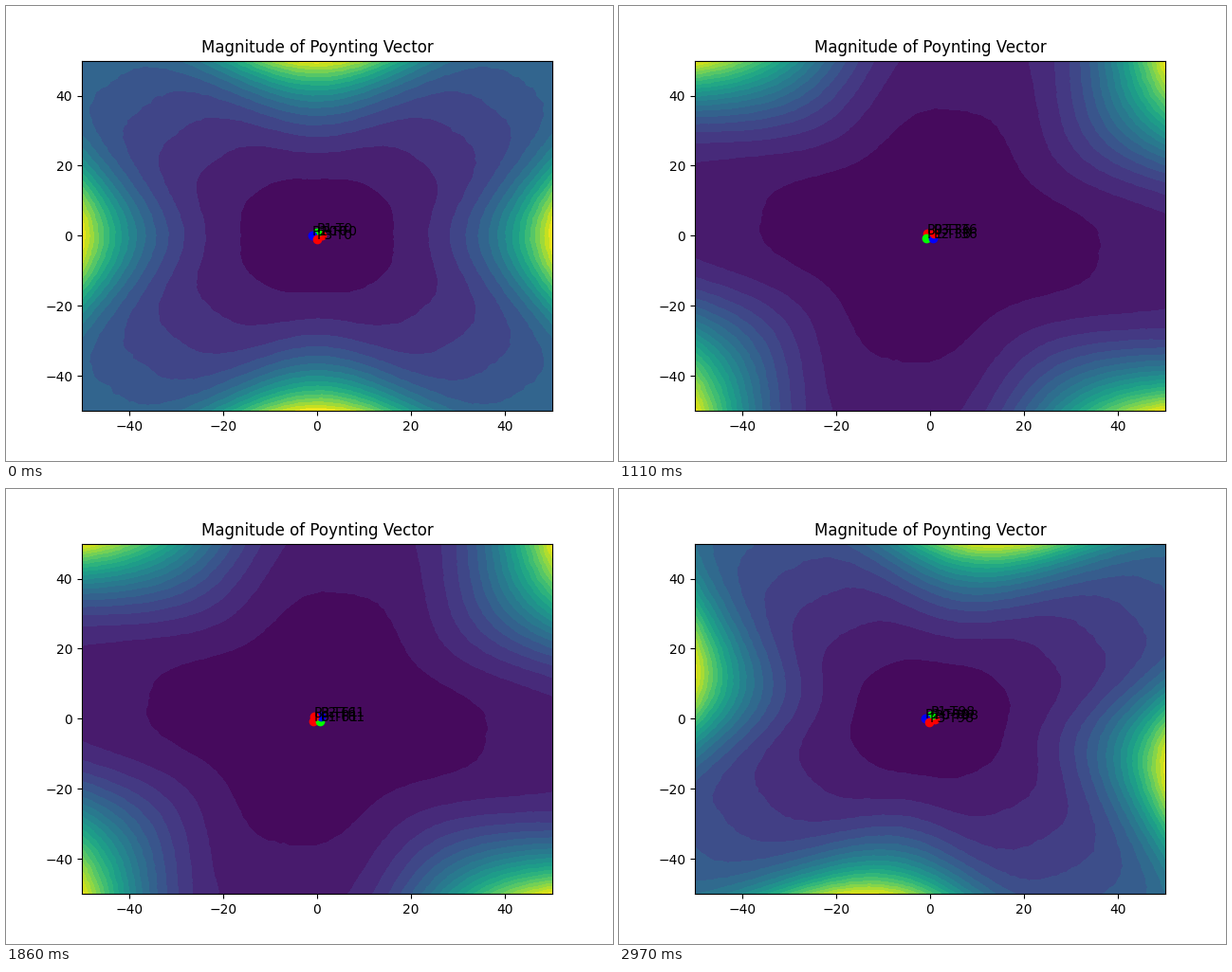
A matplotlib script that plays this animation: 640x480 px, repeating every 3000 ms.

```python
import numpy as np
import matplotlib.pyplot as plt
from matplotlib.animation import FuncAnimation

FRAMES = 100
STEP = 2 * np.pi / FRAMES
HALF = 50
COLORS = ["red", "lime", "blue", "red"]

fig, ax = plt.subplots(figsize=(6.4, 4.8), dpi=100)
ax.set_title("Magnitude of Poynting Vector")

axis = np.linspace(-HALF, HALF, 101)
X, Y = np.meshgrid(axis, axis)
R = np.hypot(X, Y)
THETA = np.arctan2(Y, X)
GRAIN = 1 + 0.01 * np.random.default_rng(4).uniform(-1, 1, R.shape)

artists = []


def magnitude(turn):
    """Round basin plus four lobes that turn with the charges."""
    basin = 2 * (R / 18) ** 1.3
    lobes = 26 * (R / HALF) ** 4.2 * np.cos(2 * (THETA - turn)) ** 4
    return (basin + lobes) * GRAIN


def draw(frame):
    while artists:
        artists.pop().remove()

    tick = max(frame - 1, 0)
    # the field lags the charges by one tick
    field = magnitude(STEP * max(tick - 1, 0))
    artists.append(ax.contourf(X, Y, field, levels=20, cmap="viridis"))

    for i, color in enumerate(COLORS):
        angle = STEP * tick + i * np.pi / 2
        x, y = np.cos(angle), np.sin(angle)
        artists.extend(ax.plot(x, y, "o", color=color))
        artists.append(ax.text(x, y, f"P{i}-T{tick}"))

    ax.set_xlim(-HALF, HALF)
    ax.set_ylim(-HALF, HALF)
    return artists


anim = FuncAnimation(fig, draw, frames=FRAMES, interval=30,
                     repeat=True, repeat_delay=0, blit=False)
plt.show()
```
